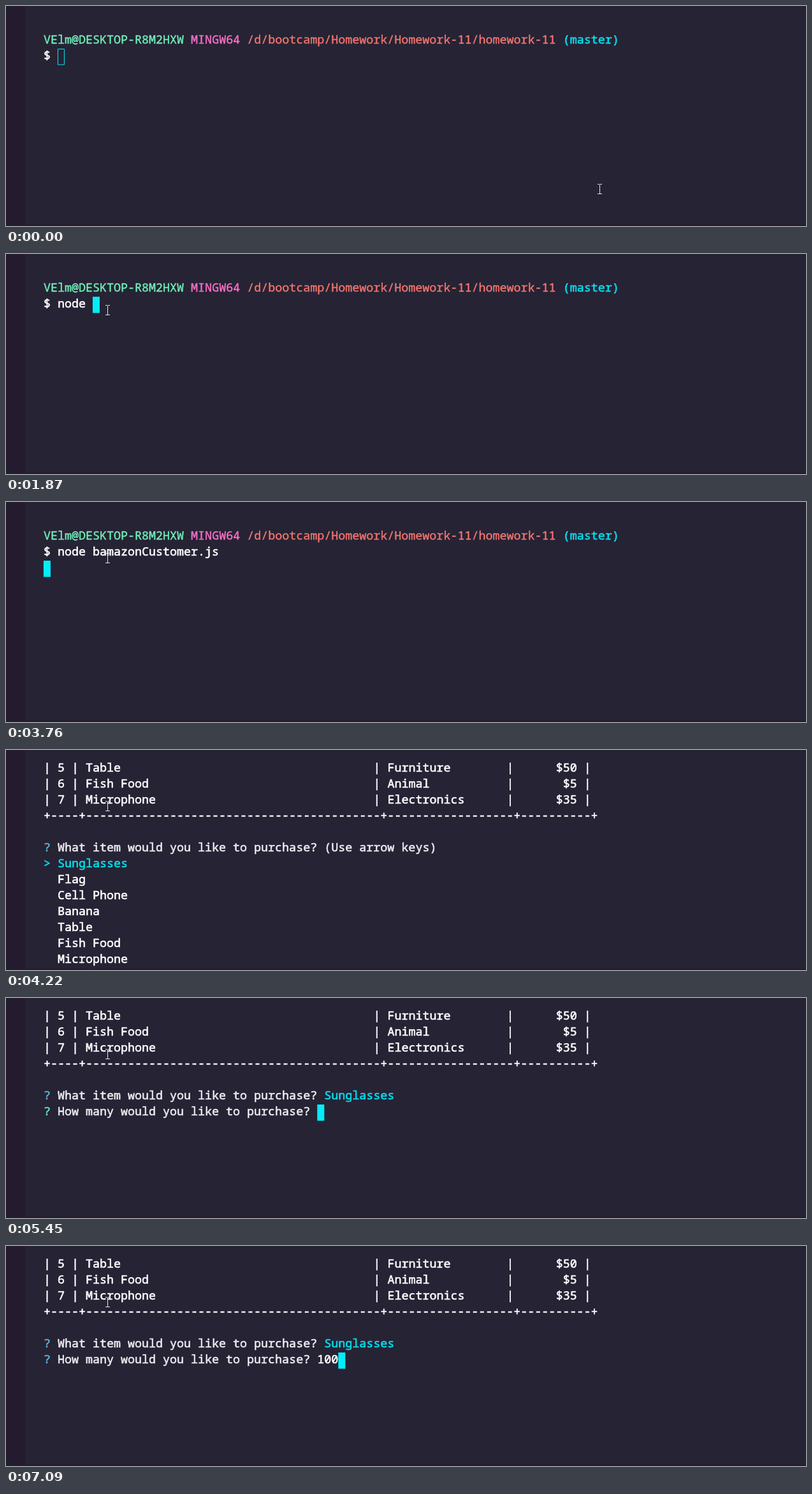
These frames come from a looping animation (1255x345 px, 8000 ms). An HTML page with a canvas:

```html
<!DOCTYPE html>
<html lang="en">
<head>
<meta charset="utf-8">
<title>Terminal session</title>
<style>
  html, body { margin: 0; width: 100%; height: 100%; overflow: hidden; background: #262335; }
  canvas { display: block; }
</style>
</head>
<body>
<canvas id="stage" width="1255" height="345"></canvas>
<script>
const ctx = document.getElementById('stage').getContext('2d');
const LOOP = 8000;
const LEFT = 58.9, TOP = 17, CELL_W = 11.01, CELL_H = 25, BASELINE = 17;
const FONT = `${CELL_W / 0.6}px "Noto Sans Mono", "DejaVu Sans Mono", monospace`;
const C = {
  bg: '#262335', side: '#241b2f', edge: '#211d2d',
  white: '#ffffff', soft: '#ececf0', green: '#72f1b8', pink: '#ff6fc4',
  path: '#f5766d', cyan: '#05e0ee', cursor: '#03edf9', blue: '#5fb0cf', teal: '#62dcbd'
};

// Each entry holds from its time until the next one.
const TYPING = [
  [0, ''], [1150, 'n'], [1230, 'no'], [1310, 'nod'], [1470, 'node'], [1870, 'node '],
  [3130, 'node b'], [3210, 'node ba'], [3440, 'node bamazonCustomer.js ']
];
const AMOUNT = [[0, ''], [6620, '1'], [6770, '10'], [7010, '100']];
const MOUSE_TIMES = [70, 150, 230, 310, 380, 460];
const FOCUS = 540, ENTER = 3760, TABLE = 4220, CHOSEN = 5450, RECOLOR = 6770;

const ITEMS = ['Sunglasses', 'Flag', 'Cell Phone', 'Banana', 'Table', 'Fish Food', 'Microphone'];
const ROWS = [
  [5, 'Table', 'Furniture', '$50'],
  [6, 'Fish Food', 'Animal', '$5'],
  [7, 'Microphone', 'Electronics', '$35']
];
const RULE = '+' + [4, 42, 18, 10].map(n => '-'.repeat(n) + '+').join('');

const valueAt = (steps, t) => steps.filter(s => s[0] <= t).pop()[1];

// A thin outline gives the regular face a medium weight.
function print(col, row, text, color = C.white, outline = 0.6) {
  const x = LEFT + col * CELL_W, y = TOP + row * CELL_H + BASELINE;
  ctx.font = FONT;
  ctx.fillStyle = ctx.strokeStyle = color;
  ctx.lineWidth = outline;
  ctx.lineJoin = 'round';
  ctx.fillText(text, x, y);
  ctx.strokeText(text, x, y);
}

function block(col, row, filled = true) {
  const x = LEFT + col * CELL_W, y = TOP + row * CELL_H, h = CELL_H + 0.5;
  if (filled) {
    ctx.fillStyle = C.cursor;
    ctx.fillRect(x, y, CELL_W, h);
  } else {
    ctx.strokeStyle = C.cursor;
    ctx.lineWidth = 1;
    ctx.strokeRect(x + 0.5, y + 0.5, CELL_W - 1, h - 1);
  }
}

function drawShell(t) {
  print(0, 1, 'VElm@DESKTOP-R8M2HXW', C.green, 0.4);
  print(21, 1, 'MINGW64', C.pink, 0.4);
  print(29, 1, '/d/bootcamp/Homework/Homework-11/homework-11', C.path, 0.4);
  print(74, 1, '(master)', C.cyan);

  const typed = valueAt(TYPING, t);
  print(0, 2, '$ ' + typed);
  if (t < ENTER) block(2 + typed.length, 2, t >= FOCUS);
  else block(0, 3);
}

function drawTable() {
  ROWS.forEach(([id, name, dept, price], row) => {
    for (const col of [0, 4, 47, 66, 77]) print(col, row, '|');
    print(2, row, String(id));
    print(6, row, name);
    print(49, row, dept);
    print(76 - price.length, row, price);
  });
  print(0, 3, RULE);
}

function drawPrompt(t) {
  print(0, 5, '?', C.blue);
  print(2, 5, 'What item would you like to purchase?', C.soft);
  if (t < CHOSEN) {
    print(40, 5, '(Use arrow keys)', C.soft);
    print(0, 6, '>', C.cyan);
    ITEMS.forEach((item, i) => print(2, 6 + i, item, i ? C.white : C.cyan));
    return;
  }
  const amount = valueAt(AMOUNT, t);
  print(40, 5, ITEMS[0], C.cyan);
  print(0, 6, '?', t < RECOLOR ? C.teal : C.blue);
  print(2, 6, 'How many would you like to purchase?', C.soft);
  print(39, 6, amount);
  block(39 + amount.length, 6);
}

function drawMouse(t) {
  const k = MOUSE_TIMES.filter(m => m <= t).length / MOUSE_TIMES.length;
  const ease = k * k * (3 - 2 * k);
  const x = Math.round(931 - 772 * ease), y = Math.round(287 - 199 * ease);
  ctx.fillStyle = '#e6e6e6';
  ctx.fillRect(x, y - 7, 1, 15);
  for (const end of [-8, 7]) {
    ctx.fillRect(x - 3, y + end, 3, 1);
    ctx.fillRect(x + 1, y + end, 3, 1);
  }
}

function frame(now) {
  const t = now % LOOP;
  ctx.fillStyle = C.bg;
  ctx.fillRect(0, 0, 1255, 345);
  ctx.fillStyle = C.side;
  ctx.fillRect(0, 0, 30, 345);
  ctx.fillStyle = C.edge;
  ctx.fillRect(0, 343, 1255, 2);
  if (t < TABLE) {
    drawShell(t);
  } else {
    drawTable();
    drawPrompt(t);
  }
  drawMouse(t);
  requestAnimationFrame(frame);
}
requestAnimationFrame(frame);
</script>
</body>
</html>
```
